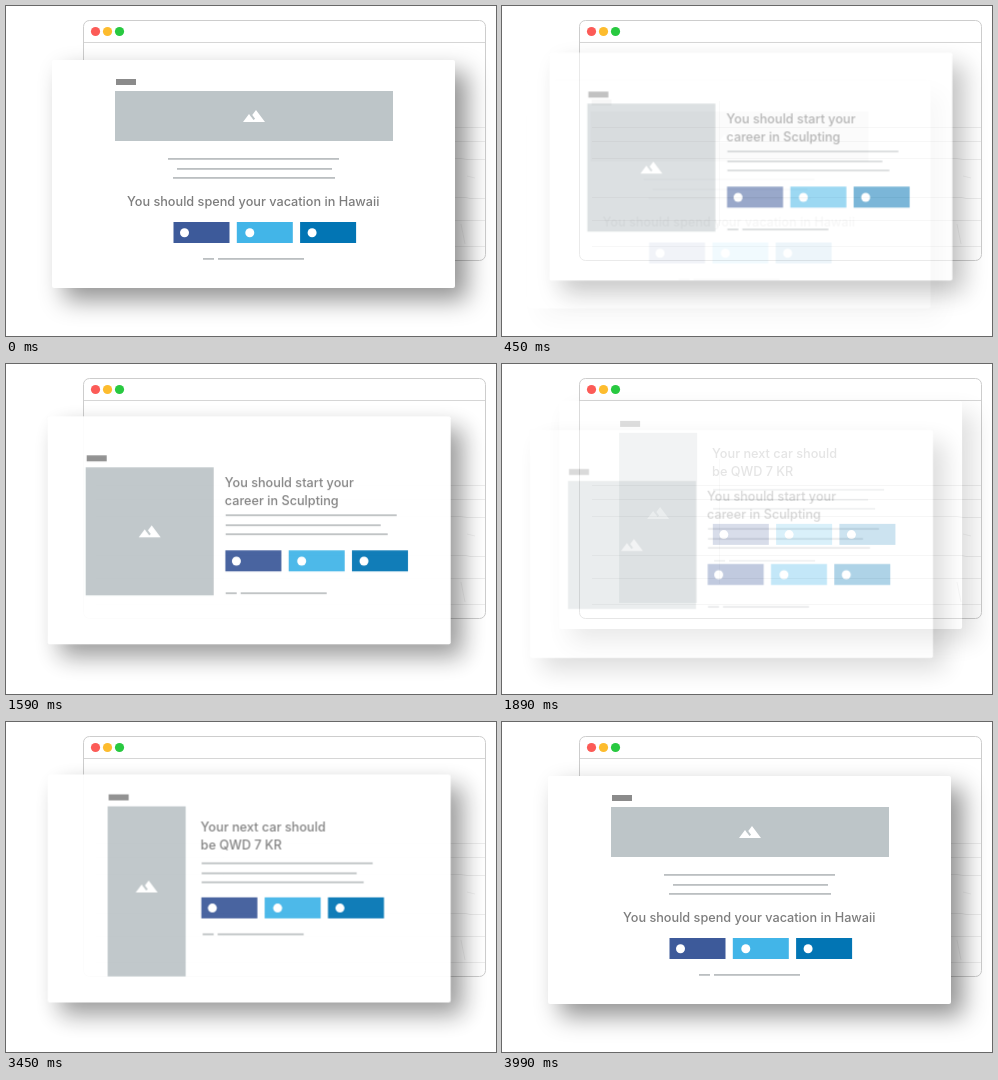
These frames come from a looping animation (490x330 px, 4.83 s). An HTML page:

```html
<!DOCTYPE html>
<html lang="en">
<head>
<meta charset="utf-8">
<title>Card layouts</title>
<style>
  html, body { margin: 0; width: 100%; height: 100%; overflow: hidden; background: #fff; }
  #stage { position: relative; width: 490px; height: 330px; overflow: hidden; }
  svg { position: absolute; left: 0; top: 0; width: 490px; height: 330px; }
  .card { position: absolute; left: 0; top: 0; width: 490px; height: 330px; will-change: transform, opacity; }
  .sheet {
    position: absolute; width: 403px; height: 228px; border-radius: 2px;
    background: #fff; box-shadow: 12px 12px 24px rgba(0, 0, 0, .43);
  }
  text { font: 500 12.7px Inter, "Open Sans", sans-serif; fill: #7d7d7d; }
</style>
</head>
<body>
<div id="stage">
  <svg viewBox="0 0 490 330">
    <g fill="none" stroke="#000" stroke-opacity=".07">
      <path d="M90 121.5H479M90 135.5H479M90 152.5H455l6 1h18M90 191.5H460l4 1h15M90 214.5H479M90 240.5H479"/>
      <path d="M455 218l4 20M469 172l-8 -2M217.5 95V220" stroke-opacity=".05"/>
    </g>
    <rect x="77.5" y="14.5" width="402" height="240" rx="6" fill="none" stroke="#cdcdcd"/>
    <path d="M78 36.5H479" stroke="#d6d6d6"/>
    <circle cx="89.5" cy="25.5" r="4.6" fill="#fc5b57"/>
    <circle cx="101.5" cy="25.5" r="4.6" fill="#fdbc2e"/>
    <circle cx="113.5" cy="25.5" r="4.6" fill="#28c940"/>
  </svg>
</div>
<script>
const LOOP = 4830, STEP = 30;
const FADE_OUT = 485, DRIFT = 25, DRIFT_TIME = 550, ENTER_DELAY = 180;

const layouts = [
  { sheet: [46, 54], tag: [110, 73], image: [109, 85, 278, 50], icon: [236, 98],
    text: [121, 200, "You should spend your vacation in Hawaii"],
    lines: [[162, 153, 171], [171, 163, 155], [167, 172, 162]],
    buttons: [167.5, 216], foot: [197, 253] },
  { sheet: [43, 51], tag: [82, 90], image: [81, 102, 128, 128], icon: [133, 154],
    text: [220, 122, "You should start your", "career in Sculpting"],
    lines: [[221, 150, 171], [221, 160, 155], [221, 169, 162]],
    buttons: [220.7, 185], foot: [221, 228] },
  { sheet: [43, 51], tag: [104, 71], image: [103, 83, 78, 170], icon: [130, 151],
    text: [196, 108, "Your next car should", "be QWD 7 KR"],
    lines: [[197, 140, 171], [197, 150, 155], [197, 159, 162]],
    buttons: [196.7, 174], foot: [198, 211] }
];

// start time, leaving card, entering card, entry distance, entry end
const changes = [
  { start: 0, from: 0, to: 1, shift: 10, end: 660 },
  { start: 1560, from: 1, to: 2, shift: 20, end: 690 },
  { start: 3420, from: 2, to: 0, shift: 20, end: 570 }
];

const rect = (x, y, w, h, fill) =>
  `<rect x="${x}" y="${y}" width="${w}" height="${h}" fill="${fill}"/>`;
const rule = (x, y, w) => rect(x, y - 1, w, 1.8, "#bbbfc1");

function button(x, y, fill, dot) {
  return rect(x, y, 56, 21, fill) +
    `<circle cx="${x + dot}" cy="${y + 10.7}" r="4.5" fill="#fff"/>`;
}

function buildCard({ sheet, tag, image, icon, text, lines, buttons, foot }) {
  const [textX, textY, ...rows] = text;
  const [bx, by] = buttons;
  const [fx, fy] = foot;
  const card = document.createElement("div");
  card.className = "card";
  card.innerHTML =
    `<div class="sheet" style="left:${sheet[0]}px;top:${sheet[1]}px"></div>
    <svg viewBox="0 0 490 330">` +
    rect(...tag, 20, 6, "#8b8b8b") +
    rect(...image, "#bdc5c8") +
    `<path transform="translate(${icon})" fill="#fff"
      d="M14 6l-3.75 5 2.85 3.8-1.6 1.2C9.81 13.75 7 10 7 10l-6 8h22z"/>` +
    rows.map((row, i) => `<text x="${textX}" y="${textY + i * 18}">${row}</text>`).join("") +
    lines.map(line => rule(...line)).join("") +
    button(bx, by, "#3d5a9a", 11) +
    button(bx + 63.3, by, "#42b5e8", 13) +
    button(bx + 126.6, by, "#0275b4", 12) +
    rule(fx, fy, 11) + rule(fx + 15, fy, 86) +
    "</svg>";
  return document.getElementById("stage").appendChild(card);
}

const cards = layouts.map(buildCard);
const clamp = v => Math.min(1, Math.max(0, v));

function place(card, offset, opacity, layer) {
  card.style.transform = `translate(${offset}px, ${-offset}px)`;
  card.style.opacity = opacity;
  card.style.zIndex = layer;
}

function render(time) {
  const t = Math.floor((time % LOOP) / STEP) * STEP;
  const { start, from, to, shift, end } = changes.filter(c => c.start <= t).pop();
  const local = t - start;
  const enter = clamp((local - ENTER_DELAY) / (end - ENTER_DELAY));
  cards.forEach(card => place(card, 0, 0, 0));
  place(cards[to], shift * (1 - enter), enter, 1);
  place(cards[from], -DRIFT * clamp(local / DRIFT_TIME), 1 - clamp(local / FADE_OUT), 2);
}

const origin = performance.now();
function tick() {
  render(performance.now() - origin);
  requestAnimationFrame(tick);
}
tick();
</script>
</body>
</html>
```
